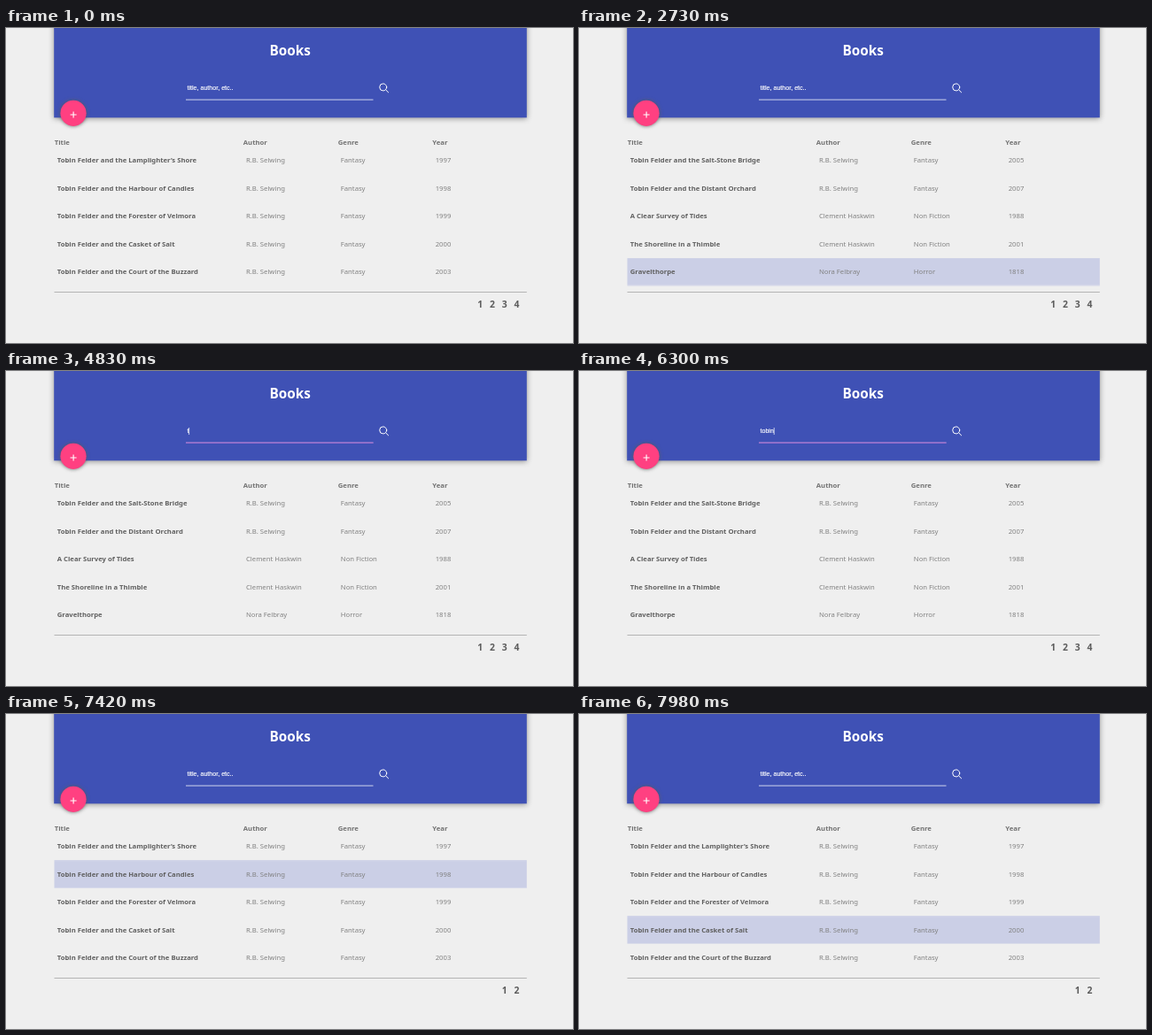
These frames come from a looping animation (640x356 px, 8000 ms). An HTML page:

```html
<!DOCTYPE html>
<html lang="en">
<head>
<meta charset="utf-8">
<title>Books</title>
<style>
  html, body { margin: 0; width: 100%; height: 100%; overflow: hidden; background: #efefef; }
  svg { display: block; width: 100vw; height: 100vh; }
  text { font: 7.7px "Noto Sans", "Open Sans", sans-serif; fill: #808080; }
  .bold, .heads text { font-weight: 700; fill: #606060; }
  .heads text { fill: #727272; }
  .title { font-size: 15.3px; font-weight: 700; fill: #fff; text-anchor: middle; }
  .pages text { font-size: 10.4px; font-weight: 700; fill: #5c5c5c; text-anchor: middle; }
  .field text { font: 7.1px "Liberation Sans", Arial, sans-serif; fill: #fff; stroke: #fff; stroke-width: .18px; }
  .menu text { font: 500 7px Inter, sans-serif; fill: #fff; }

  .banner { filter: drop-shadow(0 1.5px 3.2px rgba(0, 0, 0, .4)); }
  .fab { filter: drop-shadow(0 0 2.2px rgba(90, 90, 90, .95)); }
  .menu rect { filter: drop-shadow(0 1px 2px rgba(0, 0, 0, .4)); }

  /* One loop is 8 s, so 1% is 80 ms. */
  .all, .found, .first, .second, .hover, .focus, .hint { animation: 8s step-end infinite; }
  .all { animation-name: all; }
  .found { animation-name: found; }
  .first { animation-name: first; }
  .second { animation-name: second; }
  .hover { animation-name: hover; }
  .focus { animation-name: focus; }
  .hint { animation-name: hint; }
  .menu { animation: menu 8s linear infinite; }
  .bar { animation: bar 8s linear infinite; transform-origin: 308.5px 81px; }

  @keyframes all { 0% { opacity: 1 } 79.625%, 100% { opacity: 0 } }
  @keyframes found { 0% { opacity: 0 } 79.625%, 100% { opacity: 1 } }
  @keyframes first { 0% { opacity: 1 } 25.375% { opacity: 0 } 79.625%, 100% { opacity: 1 } }
  @keyframes second { 0% { opacity: 0 } 25.375% { opacity: 1 } 79.625%, 100% { opacity: 0 } }
  @keyframes focus { 0% { opacity: 0 } 51.625% { opacity: 1 } 79.625%, 100% { opacity: 0 } }
  @keyframes hint { 0% { opacity: 1 } 58.625% { opacity: 0 } 79.625%, 100% { opacity: 1 } }
  @keyframes menu {
    0%, 51.624% { opacity: 0 }
    51.625%, 58.625% { opacity: 1 }
    60.375%, 100% { opacity: 0 }
  }
  @keyframes bar {
    0%, 51.625% { transform: scaleX(0) }
    53.375%, 100% { transform: scaleX(1) }
  }
  @keyframes hover {
    0% { opacity: 0; transform: none }
    33.25% { opacity: 1; transform: translateY(125.6px) }
    35% { opacity: 1; transform: translateY(94.2px) }
    35.875% { opacity: 1; transform: translateY(62.8px) }
    36.75% { opacity: 1; transform: translateY(31.4px) }
    38.5% { opacity: 1; transform: none }
    40.25% { opacity: 0; transform: none }
    85.75% { opacity: 1; transform: none }
    90.125% { opacity: 1; transform: translateY(31.4px) }
    95.375% { opacity: 1; transform: translateY(62.8px) }
    98%, 100% { opacity: 1; transform: translateY(94.2px) }
  }
</style>
</head>
<body>
<svg viewBox="0 0 640 356" preserveAspectRatio="none">
  <rect width="640" height="356" fill="#efefef"/>
  <rect class="banner" x="54.2" y="-10" width="533.6" height="111.3" fill="#3f51b5"/>
  <text class="title" x="320.6" y="31">Books</text>

  <g class="field">
    <text class="hint" x="204.5" y="70.3">title, author, etc..</text>
    <text id="typed" x="204.5" y="70.3"></text>
    <rect x="203" y="80.6" width="211.5" height=".9" fill="#e0e3f3"/>
    <g class="focus">
      <rect id="caret" x="204.4" y="64" width=".7" height="8" fill="#fff"/>
      <rect class="bar" x="203" y="80.6" width="211.5" height="1" fill="#9a4fc4"/>
    </g>
  </g>
  <g fill="none" stroke="#fff" stroke-linecap="round">
    <circle cx="425.7" cy="66.9" r="4"/>
    <path d="M428.6 69.8l3 3"/>
  </g>

  <circle class="fab" cx="76" cy="96.3" r="14.6" fill="#ff4081"/>
  <path d="M72.6 98h7M76.1 94.5v7" stroke="#fff" stroke-width="1.1"/>

  <g class="heads">
    <text x="54.8" y="131.6">Title</text>
    <text x="267.8" y="131.6">Author</text>
    <text x="374.8" y="131.6">Genre</text>
    <text x="481.3" y="131.6">Year</text>
  </g>
  <rect class="hover" x="54.5" y="134.2" width="533.3" height="31.2" fill="#cbcfe6"/>
  <g id="first" class="first"></g>
  <g id="second" class="second"></g>

  <rect x="54.5" y="298" width="533.3" height="1" fill="#b4b4b4"/>
  <g id="all" class="pages all"></g>
  <g id="found" class="pages found"></g>

  <g id="menu" class="menu">
    <rect x="202.2" y="82.5" width="212" height="123.7" rx="2" fill="#25292b" stroke="#45484b" stroke-width=".6"/>
  </g>
</svg>
<script>
  const LOOP = 8000;
  const byId = id => document.getElementById(id);

  function addText(parent, x, y, words, cls) {
    const el = document.createElementNS('http://www.w3.org/2000/svg', 'text');
    el.setAttribute('x', x);
    el.setAttribute('y', y);
    if (cls) el.setAttribute('class', cls);
    el.textContent = words;
    parent.append(el);
  }

  function addRows(id, books) {
    books.forEach(([title, author, genre, year], i) => {
      const y = 152.4 + 31.4 * i;
      addText(byId(id), 57.8, y, title, 'bold');
      addText(byId(id), 271, y, author);
      addText(byId(id), 377.8, y, genre);
      addText(byId(id), 484.7, y, year);
    });
  }

  function addPages(id, count) {
    for (let n = 1; n <= count; n++) {
      addText(byId(id), 576.6 - 13.8 * (count - n), 316.2, n);
    }
  }

  const saga = (name, year) => ['Tobin Felder and the ' + name, 'R.B. Selwing', 'Fantasy', year];
  const study = (title, year) => [title, 'Clement Haskwin', 'Non Fiction', year];

  addRows('first', [
    saga('Lamplighter\u2019s Shore', 1997),
    saga('Harbour of Candles', 1998),
    saga('Forester of Velmora', 1999),
    saga('Casket of Salt', 2000),
    saga('Court of the Buzzard', 2003)
  ]);
  addRows('second', [
    saga('Salt-Stone Bridge', 2005),
    saga('Distant Orchard', 2007),
    study('A Clear Survey of Tides', 1988),
    study('The Shoreline in a Thimble', 2001),
    ['Gravelthorpe', 'Nora Felbray', 'Horror', 1818]
  ]);
  addPages('all', 4);
  addPages('found', 2);
  ['front end', 'sa', 'ss', 'c', 'swsws', 'j'].forEach((word, i) =>
    addText(byId('menu'), 208.4, 99 + 19.25 * i, word));

  // Typing: one letter per key time, cleared when the search is sent.
  const query = 'tobin';
  const keys = [4690, 5040, 5250, 5530, 5810];
  const sent = 6370;
  const typed = byId('typed');
  const caret = byId('caret');
  let start, shown = -1;

  function tick(now) {
    start ??= now;
    const t = (now - start) % LOOP;
    const count = t < sent ? keys.filter(k => t >= k).length : 0;
    if (count !== shown) {
      shown = count;
      typed.textContent = query.slice(0, count);
      const width = count ? typed.getComputedTextLength() : 0;
      caret.setAttribute('x', 204.4 + width);
    }
    requestAnimationFrame(tick);
  }
  requestAnimationFrame(tick);
</script>
</body>
</html>
```
